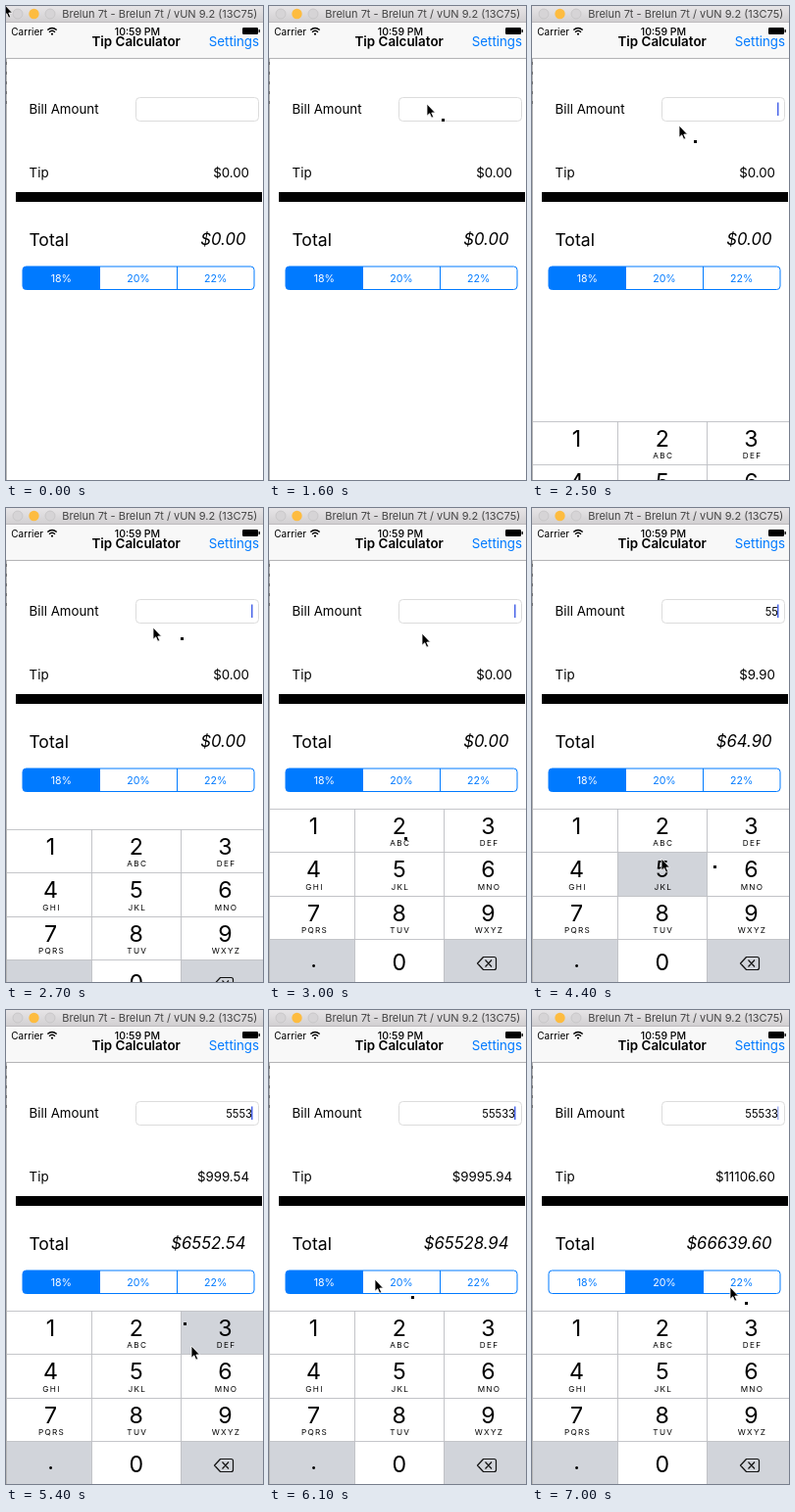
These frames come from a looping animation (262 by 484 pixels, 7.1 s). An HTML page:

```html
<!DOCTYPE html>
<html lang="en">
<head>
<meta charset="utf-8">
<title>Tip Calculator</title>
<style>
  html, body { margin: 0; width: 100%; height: 100%; overflow: hidden; background: #fff; }
  svg { display: block; width: 262px; height: 484px; font-family: Inter, "Open Sans", sans-serif; }
  .label { font-size: 13.3px; }
  .mid { text-anchor: middle; }
  .end { text-anchor: end; }
  .blue { fill: #007aff; }
  .digit { font-size: 23.2px; text-anchor: middle; }
  .letters { font-size: 8.2px; letter-spacing: 1.3px; text-anchor: middle; }
</style>
</head>
<body>
<svg viewBox="0 0 262 484">
  <defs>
    <linearGradient id="chrome" x2="0" y2="1">
      <stop stop-color="#e7e5e7"/><stop offset="1" stop-color="#d0ced0"/>
    </linearGradient>
    <clipPath id="pill"><rect x="17" y="266" width="236" height="23.5" rx="3.5"/></clipPath>
  </defs>

  <rect width="262" height="484" fill="#fff"/>
  <rect y="17" width="262" height="36" fill="#f8f8f8"/>
  <path d="M0 53.5H262" stroke="#b4b4b6"/>

  <rect width="262" height="17" fill="url(#chrome)"/>
  <path d="M0 16.5H262" stroke="#bdbbbd"/>
  <circle cx="12" cy="8" r="5" fill="#d6d4d6" stroke="#c2c0c2" stroke-width=".7"/>
  <circle cx="28.5" cy="8" r="5.2" fill="#fdbc40"/>
  <circle cx="45" cy="8" r="5" fill="#d6d4d6" stroke="#c2c0c2" stroke-width=".7"/>
  <text x="57.3" y="12.3" font-size="11" fill="#444">Brelun 7t - Brelun 7t / vUN 9.2 (13C75)</text>

  <text x="5.3" y="29.6" font-size="10">Carrier</text>
  <g fill="none" stroke="#000" stroke-width="1.4">
    <path d="M42.3 24.6Q47 20.4 51.7 24.6M44 26.7Q47 24 50 26.7"/>
    <path d="M46 28.6H48" stroke-width="1.8"/>
  </g>
  <text class="mid" x="134" y="29.9" font-size="10.5" font-weight="500">10:59 PM</text>
  <rect x="241" y="22" width="16" height="7" rx="1.3"/>
  <path d="M258.2 24V27" stroke="#000" stroke-width="1.3"/>
  <text class="mid" x="132.7" y="40.5" font-size="13.4" font-weight="600">Tip Calculator</text>
  <text class="label end blue" x="258" y="40.5">Settings</text>

  <text class="label" x="23.6" y="110">Bill Amount</text>
  <rect x="132.5" y="93.5" width="125" height="24" rx="4" fill="#fff" stroke="#dcdcdc"/>
  <text id="bill" class="end" x="251" y="109.7" font-size="11.2"></text>
  <rect id="caret" x="250" y="98.5" width="1.5" height="13.5" fill="#4a66e8"/>

  <text class="label" x="23.6" y="175">Tip</text>
  <text id="tip" class="label end" x="248" y="175"></text>
  <rect x="10" y="190" width="251" height="10"/>
  <text x="23.4" y="244.5" font-size="17.6">Total</text>
  <text id="total" class="end" x="244.5" y="244" font-size="16.7" font-style="italic"></text>

  <g id="segments"></g>
  <g id="keyboard"></g>
  <path d="M.5 54V484" stroke="#b8b8b8"/>
  <path d="M.5 57V102" stroke="#777" stroke-dasharray="3 7"/>
  <rect id="dot" x="15" y="15" width="3" height="3"/>
  <path id="arrow" d="M0 0V12.2L2.8 9.7L4.7 14.2L6.7 13.3L4.8 9H8.5Z" stroke="#fff" stroke-width=".8"/>
</svg>
<script>
const LOOP = 7100, TICK = 100;
const FOCUS = 2400, SWITCH = 6400;
const BLUE = "#007aff", GREY = "#d1d4da";
const rates = [18, 20, 22];
const digits = "55533", pressTimes = [3800, 4400, 4500, 5400, 5500];
const $ = id => document.getElementById(id);
const clamp = v => Math.max(0, Math.min(1, v));

// Pointer stops: time, x, y
const stops = [
  [500, -2, -2], [1000, 205, 235], [1500, 161, 100], [1800, 161, 100], [2200, 150, 122],
  [2700, 150, 122], [2800, 163, 117], [3000, 156, 128], [3100, 123, 321], [3600, 133, 360],
  [4400, 132, 358], [4500, 170, 350], [4700, 214, 336], [5200, 214, 336], [5400, 189, 343],
  [5500, 166, 304], [5900, 76, 272], [6300, 140, 278], [6800, 202, 283]
];

// Eased position between neighbouring stops
function pointer(t) {
  const next = stops.findIndex(s => s[0] > t);
  const b = stops.at(next), a = next > 0 ? stops[next - 1] : b;
  const k = clamp((t - a[0]) / (b[0] - a[0] || 1));
  const ease = k * k * (3 - 2 * k);
  return [a[1] + (b[1] - a[1]) * ease, a[2] + (b[2] - a[2]) * ease];
}

// Critically damped spring
function keyboardOffset(t) {
  const s = Math.max(0, t - FOCUS) * 0.0123;
  return Math.floor(180 * (1 + s) * Math.exp(-s));
}

function caretOpacity(t, lastInput) {
  if (t < FOCUS) return 0;
  const phase = (t - lastInput) % 850;
  return clamp((700 - phase) / 100);
}

function buildSegments() {
  const w = 236 / 3;
  const cells = rates.map((r, i) => `
    <rect id="seg${i}" x="${17 + i * w}" y="266" width="${w}" height="24" clip-path="url(#pill)"/>
    <text id="rate${i}" class="mid" x="${17 + (i + 0.5) * w}" y="282.2" font-size="10.6">${r}%</text>`);
  $("segments").innerHTML = cells.join("") + `
    <path d="M95.5 266V289.5M174.5 266V289.5" stroke="${BLUE}"/>
    <rect x="17" y="266" width="236" height="23.5" rx="3.5" fill="none" stroke="${BLUE}"/>`;
}

function buildKeyboard() {
  const keys = "1 2 3 4 5 6 7 8 9 . 0".split(" ");
  const letters = " ABC DEF GHI JKL MNO PQRS TUV WXYZ".split(" ");
  const mids = [45.5, 132.8, 223.5], pitch = 44.6;
  let html = "";
  for (let i = 0; i < 12; i++) {
    const c = i % 3, r = Math.floor(i / 3), top = Math.round(307.6 + r * pitch) - 0.5;
    const lift = keys[i] === "." ? 3 : 0, low = r === 3 ? 5.8 : 0;
    html += `<rect id="key${i + 1}" x="${87.5 + (c - 1) * 91}" y="${top}" width="91" height="45"
      fill="${i === 9 || i === 11 ? GREY : "#fff"}" stroke="#bfc1c5" stroke-width=".9"/>`;
    if (keys[i]) html += `<text class="digit" x="${mids[c]}" y="${332.7 + r * pitch + low - lift}">${keys[i]}</text>`;
    if (letters[i]) html += `<text class="letters" x="${mids[c] + 1}" y="${345 + r * pitch}">${letters[i]}</text>`;
  }
  html += `<path d="M218.5 458.5H229.5Q231.5 458.5 231.5 460.5V469.5Q231.5 471.5 229.5 471.5H218.5L212.5 465Z
      M220.5 461.5L227 468.5M227 461.5L220.5 468.5" fill="none" stroke="#111" stroke-width="1.2" stroke-linejoin="round"/>`;
  $("keyboard").innerHTML = html;
}

const place = (id, x, y) => $(id).setAttribute("transform", `translate(${x} ${y})`);

function draw(now) {
  const t = Math.floor((now % LOOP) / TICK) * TICK;

  // The dot runs one tick ahead of the arrow
  place("arrow", ...pointer(t));
  place("dot", ...pointer(t + TICK));
  $("dot").setAttribute("opacity", t < stops[0][0] ? 0 : 1);

  const count = pressTimes.filter(p => p <= t).length;
  const bill = digits.slice(0, count);
  const lastInput = count ? pressTimes[count - 1] : FOCUS;
  place("keyboard", 0, keyboardOffset(t));
  for (const d of new Set(digits)) {
    const down = bill.endsWith(d) && t - lastInput < TICK;
    $("key" + d).setAttribute("fill", down ? GREY : "#fff");
  }
  $("caret").setAttribute("opacity", caretOpacity(t, lastInput));

  const chosen = t < SWITCH ? 0 : 1;
  const tip = bill * rates[chosen] / 100;
  $("bill").textContent = bill;
  $("tip").textContent = "$" + tip.toFixed(2);
  $("total").textContent = "$" + (+bill + tip).toFixed(2);
  rates.forEach((r, i) => {
    $("seg" + i).setAttribute("fill", i === chosen ? BLUE : "#fff");
    $("rate" + i).setAttribute("fill", i === chosen ? "#fff" : BLUE);
  });
}

buildSegments();
buildKeyboard();
const start = performance.now();
function frame() {
  draw(performance.now() - start);
  requestAnimationFrame(frame);
}
frame();
</script>
</body>
</html>
```
